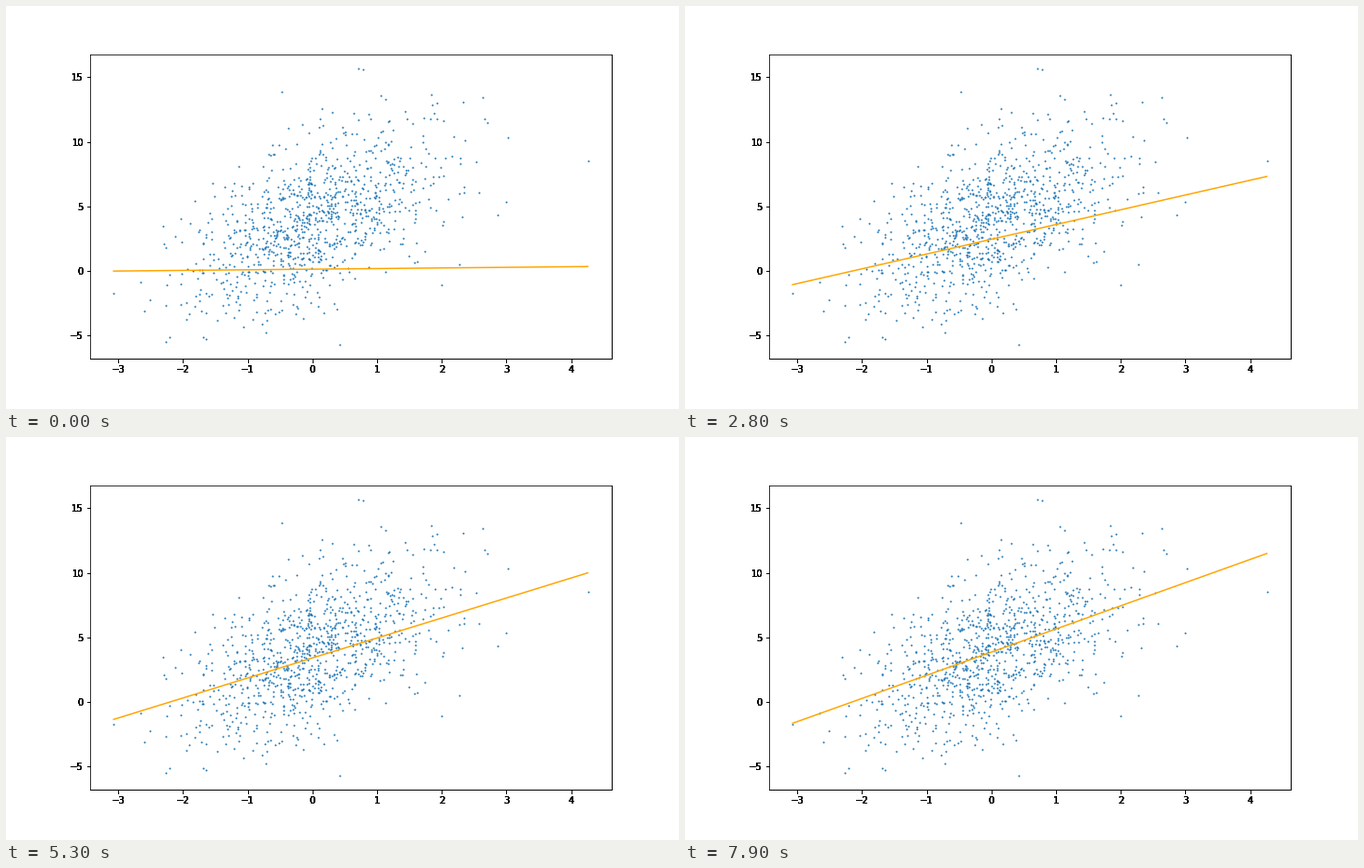
Recreate the animation shown at these times as a matplotlib script. Size 720 by 432 pixels, loop 8 s.

```python
import numpy as np
import matplotlib.pyplot as plt
from matplotlib.animation import FuncAnimation

FRAMES, INTERVAL = 80, 100
BOX = [0.125, 0.125, 0.775, 0.755]
XLIM, YLIM = (-3.437, 4.628), (-6.776, 16.773)
X_ENDS = (-3.073, 4.258)

# Samples that stand apart from the cloud
OUTLIERS = np.array([
    (-3.07, -1.72), (4.26, 8.53), (0.71, 15.68), (0.78, 15.6), (0.42, -5.7),
    (3.02, 10.33), (3.0, 5.35), (2.64, 13.44), (2.86, 4.35), (2.27, 0.5),
    (2.0, -1.08), (-2.6, -3.1), (-2.27, -5.47), (-0.48, 13.85), (2.33, 13.07),
])


def sample_cloud(n=1000, radius=2.8):
    """Noisy linear data: a seeded Gaussian core plus the outliers."""
    z = np.random.default_rng(7).standard_normal((1300, 2))
    x, noise = z[np.hypot(*z.T) < radius][:n - len(OUTLIERS)].T
    core = np.column_stack([x, 4.2 + 1.9 * x + 3.0 * noise])
    return np.vstack([core, OUTLIERS]).T


def fit_ends(i):
    """Heights of the fitted line at X_ENDS: quick start, slow approach."""
    left = -0.73 * (1 - np.exp(-i / 5)) - 0.0115 * i
    right = 13.2 - 11.6 * np.exp(-0.0243 * i) - 1.25 * np.exp(-i / 4)
    return left, right


def add_axes(**kw):
    return fig.add_axes(BOX, xlim=XLIM, ylim=YLIM, xticks=range(-3, 5),
                        yticks=range(-5, 16, 5), **kw)


plt.rcParams.update({"font.family": "DejaVu Sans", "font.size": 10})
fig = plt.figure(figsize=(10, 6), dpi=72, facecolor="white")
ax = add_axes()
ax.scatter(*sample_cloud(), s=1, color="C0")
line, = ax.plot([], [], color="orange", lw=1.5)
ax.set(xlim=XLIM, ylim=YLIM)

# Overlaid copies harden the tick labels and the outer frame edges
for i in range(6):
    overlay = add_axes(facecolor="none", label=f"overlay {i}")
    overlay.spines[["left", "top"]].set_visible(False)


def update(i):
    line.set_data(X_ENDS, fit_ends(i))
    return line,


anim = FuncAnimation(fig, update, frames=FRAMES, interval=INTERVAL,
                     repeat=True, repeat_delay=0)
plt.show()
```
